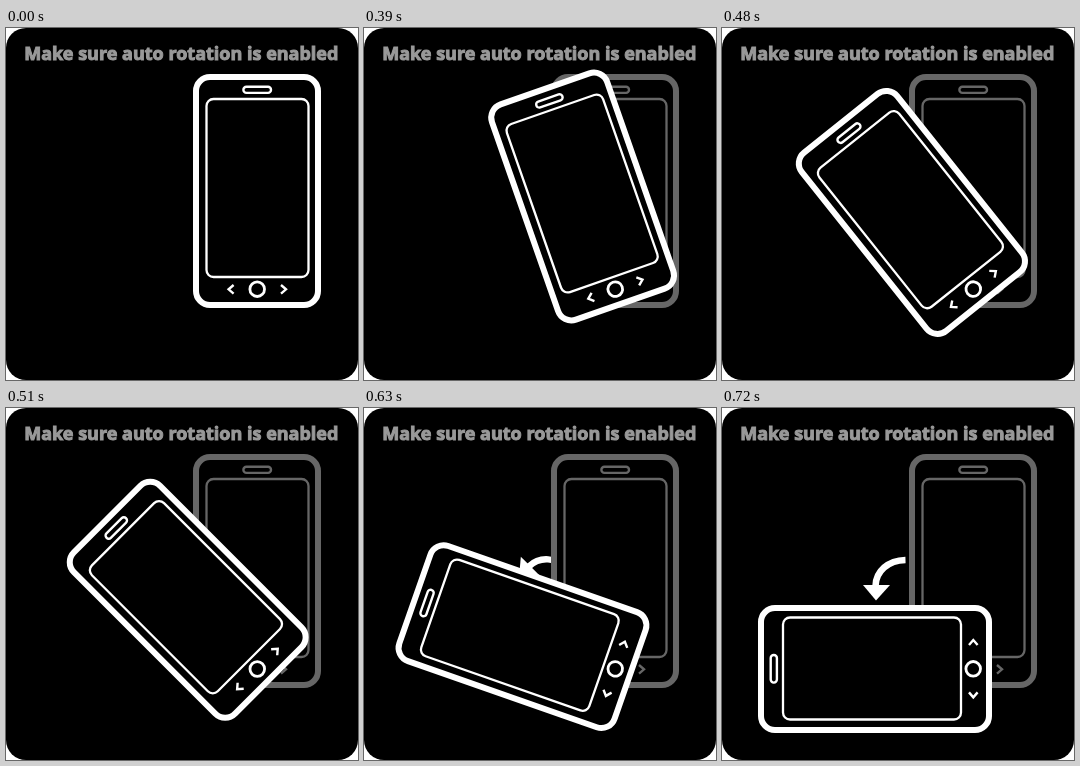
Write an HTML page that moves like this. It is 352x352 px and loops after 0.9 s.

```html
<!DOCTYPE html>
<html lang="en">
<head>
<meta charset="utf-8">
<title>Rotate your phone</title>
<style>
  html, body { margin: 0; width: 100%; height: 100%; overflow: hidden; background: #fff; }
  svg { display: block; width: 100vw; height: 100vh; }
  text { font: 700 18px "Open Sans", sans-serif; fill: #999; stroke: #999; stroke-width: 1; }
</style>
</head>
<body>
<svg viewBox="0 0 352 352">
  <defs>
    <g id="handset" fill="none" stroke="currentColor">
      <rect x="190" y="49" width="122" height="228" rx="14" fill="#000" stroke-width="6"/>
      <rect x="200.5" y="71" width="102" height="178" rx="7" stroke-width="2.3"/>
      <rect x="237.4" y="58.7" width="27.6" height="6.2" rx="3" stroke-width="2.4"/>
      <circle cx="251.2" cy="261.2" r="7.3" stroke-width="2.8"/>
      <path d="M227.6 257l-5 4.3 5 4.3M275 257l5 4.3-5 4.3" stroke-width="2.4"/>
    </g>
  </defs>
  <rect width="352" height="352" rx="20"/>
  <text x="175.3" y="31.5" text-anchor="middle">Make sure auto rotation is enabled</text>
  <g id="arrow">
    <path d="M183.5 152C166 152.5 154 163 153.5 178" fill="none" stroke="#fff" stroke-width="6.5"/>
    <path d="M141 177H168L154 192.5Z" fill="#fff"/>
  </g>
  <use id="ghost" href="#handset" color="#666"/>
  <use id="phone" href="#handset" color="#fff"/>
</svg>
<script>
  const LOOP = 900, START = 330, STEP = 30, STEPS = 14;
  const ARROW_STEPS = 6, ARROW_TURN = 15;
  const [arrow, ghost, phone] = ["arrow", "ghost", "phone"].map(id => document.getElementById(id));

  const show = (el, on) => el.setAttribute("visibility", on ? "visible" : "hidden");
  const turn = (el, deg, x, y) => el.setAttribute("transform", `rotate(${deg} ${x} ${y})`);

  function draw(ms) {
    const t = ms % LOOP;
    const step = Math.max(0, Math.min(STEPS, Math.floor((t - START) / STEP + 1e-6) + 1));
    const left = STEPS - step;
    turn(phone, -90 * step / STEPS, 251, 261);
    // The arrow swings out from behind the phones.
    turn(arrow, ARROW_TURN * left, 183, 182);
    show(arrow, left <= ARROW_STEPS);
    show(ghost, step > 0);
  }

  const begin = performance.now();
  function tick() {
    draw(performance.now() - begin);
    requestAnimationFrame(tick);
  }
  draw(0);
  requestAnimationFrame(tick);
</script>
</body>
</html>
```
